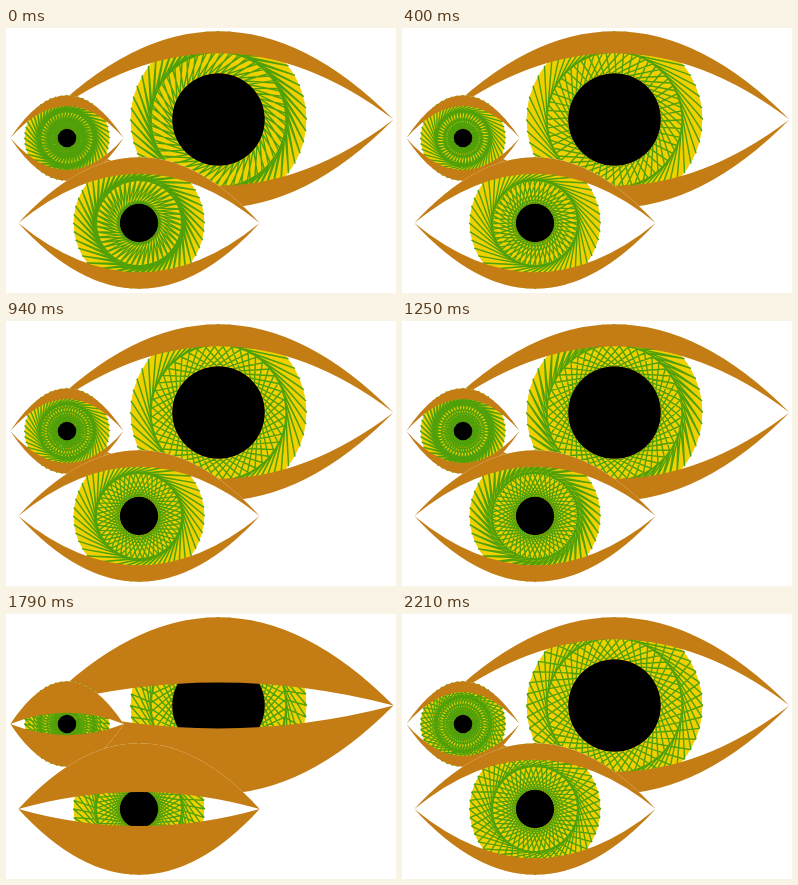
An HTML page for the animation above (2310 ms loop, 390 by 265 pixels).

```html
<!DOCTYPE html>
<html lang="en">
<head>
<meta charset="utf-8">
<style>
html, body { margin: 0; width: 100%; height: 100%; overflow: hidden; background: #fff; }
svg { display: block; }
</style>
</head>
<body>
<svg id="stage" width="390" height="265" viewBox="0 0 390 265"></svg>
<script>
const LOOP = 2310;
const STEPS = 17;
const BLINK = 13;
const SPOKES = 48;

// Back to front: centre, half width, iris and pupil radius.
const EYES = [
  { x: 212.5, y: 91.5, w: 175, r: 88.3, pupil: 46.3 },
  { x: 61, y: 110, w: 56.7, r: 42.8, pupil: 9.3 },
  { x: 133, y: 195, w: 120.7, r: 65.8, pupil: 19.2 }
];

const num = v => v.toFixed(2);

function add(tag, attrs) {
  const node = document.createElementNS('http://www.w3.org/2000/svg', tag);
  for (const key in attrs) node.setAttribute(key, attrs[key]);
  return document.getElementById('stage').appendChild(node);
}

function lens({ x, y, w }, h) {
  return `M${x - w} ${y}Q${x} ${y - 2 * h} ${x + w} ${y}Q${x} ${y + 2 * h} ${x - w} ${y}Z`;
}

// Steps alternate short and long, with one pause in the middle.
function startOf(step) {
  return 135 * step + (step % 2 ? -5 : 10) + (step > 8 ? 40 : 0);
}

function stepAt(time) {
  let step = 0;
  while (step + 1 < STEPS && startOf(step + 1) <= time) step++;
  return step;
}

// Two families of strands, each bent once at the ring halfway to the pupil.
function strands({ x, y, r, pupil }, phase) {
  const mid = (r + pupil) / 2;
  const outer = Math.acos(mid / r), inner = Math.acos(pupil / mid);
  const families = [
    { out: 1, inn: .5 },
    { out: .35 + .6 * Math.sin(.6 + 3.6 * phase), inn: .3 - .8 * Math.sin(2.3 * phase) }
  ];
  const at = (radius, angle) => `${num(x + radius * Math.cos(angle))} ${num(y + radius * Math.sin(angle))}`;
  let path = '';
  for (let i = 0; i < SPOKES; i++) {
    const angle = i * 2 * Math.PI / SPOKES;
    for (const { out, inn } of families) {
      const bend = angle - outer * out;
      path += `M${at(r, angle)}L${at(mid, bend)}L${at(pupil, bend - inner * inn)}`;
    }
  }
  return path;
}

for (const eye of EYES) {
  add('path', { d: lens(eye, eye.r), fill: '#fff' });
  add('circle', { cx: eye.x, cy: eye.y, r: eye.r - .5, fill: '#f0d000' });
  eye.strands = add('path', { fill: 'none', stroke: '#50a00a', 'stroke-width': 1.4 });
  add('circle', { cx: eye.x, cy: eye.y, r: eye.pupil, fill: '#000' });
  eye.lids = add('path', { fill: '#c47d14', 'fill-rule': 'evenodd' });
}

let shown = -1;
function draw(time) {
  const step = stepAt(time % LOOP);
  if (step === shown) return;
  shown = step;
  const open = step === BLINK ? .26 : .75;
  for (const eye of EYES) {
    eye.strands.setAttribute('d', strands(eye, step / (STEPS - 1)));
    eye.lids.setAttribute('d', lens(eye, eye.r) + lens(eye, eye.r * open));
  }
}

const begin = performance.now();
function tick() {
  draw(performance.now() - begin);
  requestAnimationFrame(tick);
}
tick();
</script>
</body>
</html>
```
